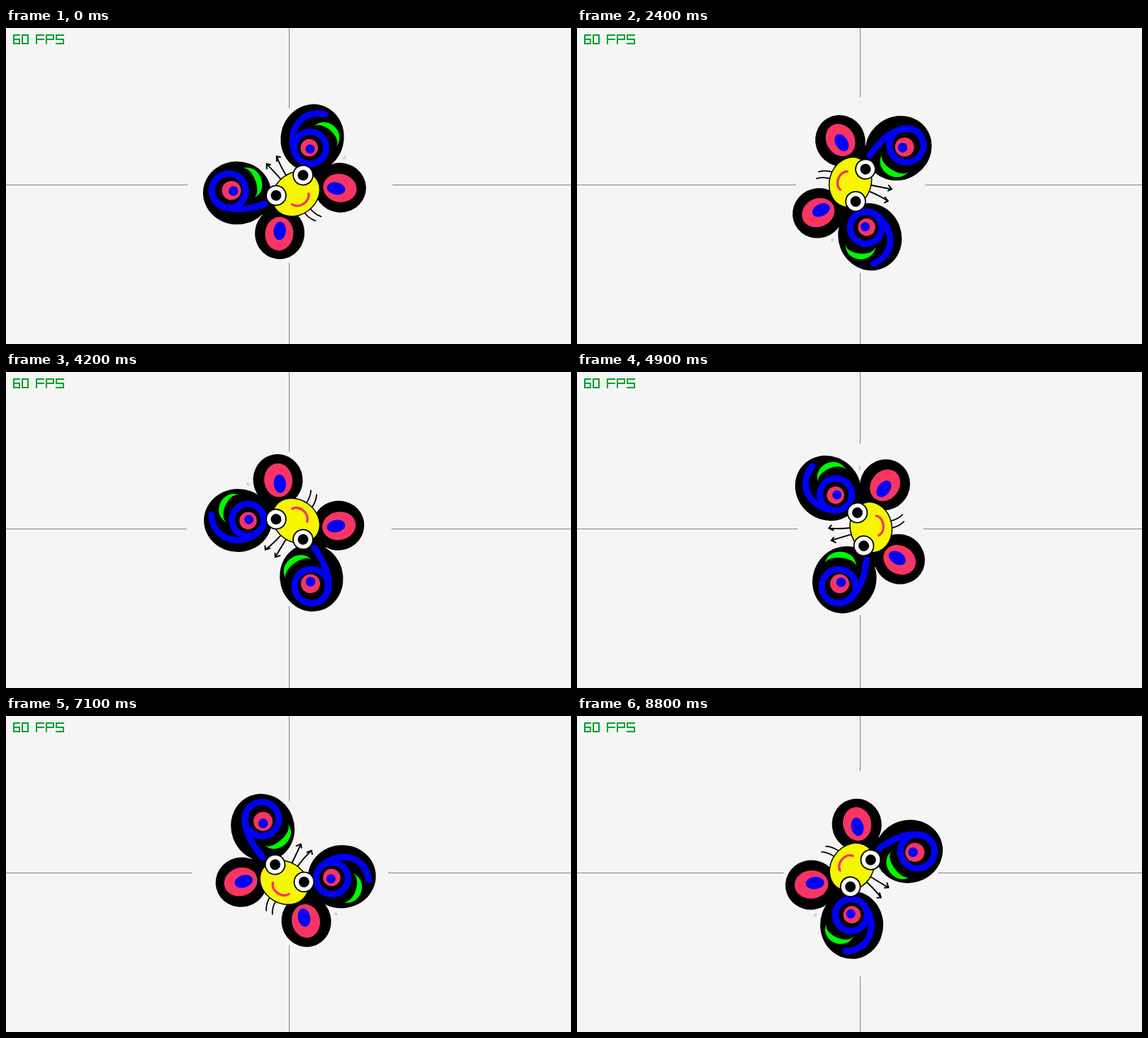
Recreate the animation shown at these times as an HTML page with a canvas. Size 797x446 px, loop 8.9 s.

```html
<!DOCTYPE html>
<html lang="en">
<head>
<meta charset="utf-8">
<title>Spinning butterfly</title>
<style>
html, body { margin: 0; width: 100%; height: 100%; overflow: hidden; background: #f5f5f5; }
canvas { display: block; }
</style>
</head>
<body>
<canvas id="stage" width="797" height="446" role="img" aria-label="60 FPS, a spinning butterfly"></canvas>
<script>
const ctx = document.getElementById('stage').getContext('2d');
const W = 797, H = 446, CX = 400, CY = 222;
const LOOP = 8900, STEP = 100, TURN = 6, FIRST = -37;
const HELD = [50, 63, 65, 69, 72, 87]; // steps on which the picture waits

const PAPER = '#f5f5f5', GREY = '#828282', LIME = '#009e2f';
const BLACK = '#000', BLUE = '#0000fa', PINK = '#f83463';
const YELLOW = '#f6f600', GREEN = '#00fa00', WHITE = '#fdfdfd';

const rad = deg => deg * Math.PI / 180;

function angleAt(ms) {
  let step = Math.floor((ms % LOOP) / STEP);
  if (HELD.includes(step)) step--;
  const slip = step > 87 ? -4 : step > 28 ? 2 : 0;
  return FIRST + TURN * step + slip;
}

function oval(x, y, rx, ry, color, deg = 0) {
  ctx.beginPath();
  ctx.ellipse(x, y, rx, ry, rad(deg), 0, 2 * Math.PI);
  ctx.fillStyle = color;
  ctx.fill();
}

const disc = (x, y, r, color) => oval(x, y, r, r, color);

function stroke(path, width, color) {
  ctx.lineWidth = width;
  ctx.strokeStyle = color;
  ctx.stroke(new Path2D(path));
}

function ring(x, y, r, width, color) {
  ctx.beginPath();
  ctx.arc(x, y, r, 0, 2 * Math.PI);
  ctx.lineWidth = width;
  ctx.strokeStyle = color;
  ctx.stroke();
}

// Moon between two tips, its edges bulging to the right of the chord
function crescent(x1, y1, x2, y2, outer, inner, color) {
  const len = Math.hypot(x2 - x1, y2 - y1);
  const nx = (y2 - y1) / len * 4 / 3, ny = (x1 - x2) / len * 4 / 3;
  ctx.beginPath();
  ctx.moveTo(x1, y1);
  ctx.bezierCurveTo(x1 + nx * outer, y1 + ny * outer, x2 + nx * outer, y2 + ny * outer, x2, y2);
  ctx.bezierCurveTo(x2 + nx * inner, y2 + ny * inner, x1 + nx * inner, y1 + ny * inner, x1, y1);
  ctx.fillStyle = color;
  ctx.fill();
}

function drawAntenna(side) {
  const tip = 1.2 + 8.8 * side;
  stroke(`M${4.5 * side},-13 Q${6 * side},-30 ${tip},-43.5`, 2, BLACK);
  stroke(`M${tip - 4},-38 L${tip},-43.5 L${tip + 3.5},-39.5`, 2, BLACK);
}

function drawLeg(x) {
  stroke(`M${x},43 q0,11 5.5,19`, 1.8, BLACK);
}

// Black shapes and the lower wing, alike on both sides
function drawWings(side) {
  oval(65.7 * side, side - 34.9, 48, 44.5, BLACK, -38 * side);
  oval(1.6 + 53.4 * side, 45.7, 36.5, 35, BLACK, 45 * side);
  const [a, b, c, d] = [62, 28, 22, 48].map(x => x * side);
  ctx.fill(new Path2D(`M${a},3 L${b},-12 L${c},25 L${d},20`));
  oval(0.8 + 53.6 * side, 45.8, 23.8, 19.9, PINK, 48 * side);
  oval(49.7 * side, 43.1, 13, 8.7, BLUE, 48 * side);
}

function drawLeftMarks() {
  ring(-73, -45.5, 24, 9, BLUE);
  stroke('M-96,-41 Q-88,-14 -44,0', 9, BLUE);
  disc(-69.8, -43.5, 13.5, PINK);
  disc(-68.2, -41.2, 6.8, BLUE);
  crescent(-39.1, -59, -51.7, -16.5, 20, 11.5, GREEN);
}

function drawRightMarks() {
  ring(55, -24.8, 22.5, 9, BLUE);
  stroke('M33,-30 C40,-62 78,-78 100.4,-49.7', 9, BLUE);
  disc(54, -25.5, 12.3, PINK);
  disc(54, -23.4, 6.5, BLUE);
  crescent(74.7, -45.4, 84, -3.4, 21.5, 13.5, GREEN);
}

function drawEye(side) {
  disc(23.8 * side, 0, 14.8, BLACK);
  disc(23.8 * side, 0, 13, WHITE);
  disc(23.8 * side, 0, 7.5, BLACK);
}

function drawButterfly(deg) {
  const sides = [-1, 1];
  ctx.save();
  ctx.translate(CX, CY);
  ctx.rotate(rad(deg));
  ctx.lineCap = ctx.lineJoin = 'round';
  ctx.fillStyle = PAPER;
  ctx.fillRect(-118.7, -87, 237.4, 174);
  sides.forEach(drawAntenna);
  [-6.5, 3.5].forEach(drawLeg);
  sides.forEach(drawWings);
  drawLeftMarks();
  drawRightMarks();
  oval(85.5, 15.5, 3, 1.6, '#cfcfcf');
  oval(0, 15, 36.5, 30.2, BLACK);
  oval(0, 15, 35, 28.7, YELLOW);
  stroke('M-13.2,23.6 C-9,36 11,35 14.3,25.5', 3.4, PINK);
  sides.forEach(drawEye);
  ctx.restore();
}

// Seven-segment lettering: top, upper left/right, middle, lower left/right, base
const GLYPHS = { 6: 'tlmLRb', 0: 'tlrLRb', F: 'tlmL', P: 'tlrmL', S: 'tlmRb' };
const CELL = 2;

function drawSegment(name, x, y, w, h) {
  const lower = 'LR'.includes(name) ? h : 0;
  const right = 'rR'.includes(name) ? w : 0;
  const level = 'tmb'.indexOf(name);
  stroke(level < 0
    ? `M${x + right},${y + lower} v${h}`
    : `M${x},${y + level * h} h${w}`, CELL, LIME);
}

function drawCounter(text) {
  let x = 11;
  ctx.lineCap = 'square';
  for (const char of text) {
    const w = CELL * (char === ' ' ? 2 : char > '9' ? 5 : 4);
    for (const name of GLYPHS[char] || '') drawSegment(name, x, 10, w, 3 * CELL);
    x += w + 2 * CELL;
  }
}

function draw(ms) {
  ctx.fillStyle = PAPER;
  ctx.fillRect(0, 0, W, H);
  ctx.fillStyle = GREY;
  ctx.fillRect(0, 221, W, 1);
  ctx.fillRect(399, 0, 1, H);
  drawButterfly(angleAt(ms));
  drawCounter('60 FPS');
}

const start = performance.now();
function tick() {
  draw(performance.now() - start);
  requestAnimationFrame(tick);
}
tick();
</script>
</body>
</html>
```
